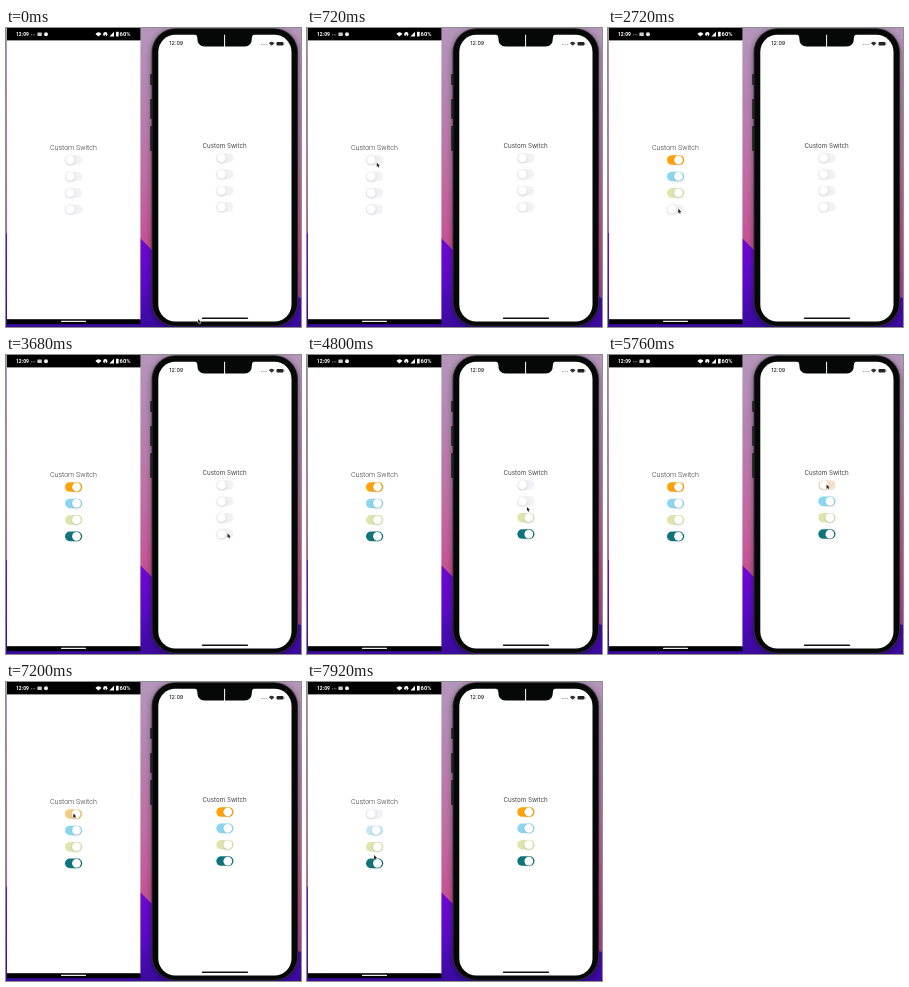
Animation of 295 by 299 pixels, one loop 8000 ms. Source, as an HTML page with a canvas:

```html
<!DOCTYPE html>
<html lang="en">
<head>
<meta charset="utf-8">
<title>Custom Switch</title>
<style>
html, body { margin: 0; width: 100%; height: 100%; overflow: hidden; background: #000; }
canvas { display: block; width: 295px; height: 299px; }
</style>
</head>
<body>
<canvas id="stage"></canvas>
<script>
const W = 295, H = 299, LOOP = 8000;
const canvas = document.getElementById('stage');
const dpr = window.devicePixelRatio || 1;
canvas.width = Math.round(W * dpr);
canvas.height = Math.round(H * dpr);
const ctx = canvas.getContext('2d');
ctx.scale(dpr, dpr);

const OFF = [242, 242, 245];
const COLORS = [[255, 163, 11], [139, 215, 242], [226, 228, 174], [16, 116, 124]];

// The left column is switched on downwards, the right one upwards;
// then the first two on the left are switched off again.
const switches = COLORS.flatMap((color, i) => [
  { color, i, x: 59, y: 132 + 16.45 * i, on: 950 + 610 * i, off: i < 2 ? 7000 + 690 * i : Infinity },
  { color, i, x: 210.3, y: 130 + 16.35 * i, on: 5700 - 640 * i, off: Infinity }
]);

// The pointer visits every switch at the moment it is pressed.
const presses = switches
  .flatMap(s => [s.on, s.off].map(t => ({ t, x: s.x + 8.3 + s.i, y: s.y - 0.5 })))
  .filter(p => p.t < LOOP)
  .sort((a, b) => a.t - b.t);
const stops = [{ t: 0, x: 192, y: 291 }, ...presses, { t: LOOP, x: 67, y: 174 }];

const clamp = v => Math.max(0, Math.min(1, v));
const smooth = v => v * v * (3 - 2 * v);
const lerp = (a, b, k) => a + (b - a) * k;

function box(x, y, w, h, r, fill) {
  ctx.beginPath();
  ctx.roundRect(x, y, w, h, r);
  ctx.fillStyle = fill;
  ctx.fill();
}

function dot(x, y, r, fill) {
  ctx.beginPath();
  ctx.arc(x, y, r, 0, Math.PI * 2);
  ctx.fillStyle = fill;
  ctx.fill();
}

function poly(points, fill) {
  ctx.beginPath();
  points.forEach(([x, y]) => ctx.lineTo(x, y));
  ctx.closePath();
  ctx.fillStyle = fill;
  ctx.fill();
}

function label(str, x, y, font, fill, align = 'left') {
  ctx.font = font;
  ctx.textAlign = align;
  ctx.fillStyle = fill;
  ctx.fillText(str, x, y);
}

function wifi(x, y, r, fill) {
  ctx.beginPath();
  ctx.moveTo(x, y);
  ctx.arc(x, y, r, -Math.PI * 0.77, -Math.PI * 0.23);
  ctx.closePath();
  ctx.fillStyle = fill;
  ctx.fill();
}

function shadow(color, blur, dy) {
  ctx.shadowColor = color;
  ctx.shadowBlur = blur * dpr;
  ctx.shadowOffsetY = dy * dpr;
}

function vertical(top, ...colors) {
  const g = ctx.createLinearGradient(0, top, 0, H);
  colors.forEach((c, i) => g.addColorStop(i / (colors.length - 1), c));
  return g;
}

function wallpaper() {
  ctx.fillStyle = vertical(0, '#b596bb', '#b583b0', '#bf6ea2', '#c64f90', '#9c3fb0');
  ctx.fillRect(0, 0, W, H);
  poly([[0, 205], [134, 210], [150, 226], [W, 270], [W, H], [0, H]],
    vertical(210, '#7008d4', '#5a0bc6', '#3a0a9e'));
}

function leftPhone() {
  ctx.fillStyle = '#fff';
  ctx.fillRect(1, 12, 133.4, 280);
  ctx.fillStyle = '#000';
  ctx.fillRect(1, 0, 133.4, 12.4);
  ctx.fillRect(1, 291.2, 133.4, 5);
  box(55, 292.8, 25, 1.3, 0.6, '#eee');

  label('12:09', 10, 8, 'bold 5px Roboto, sans-serif', '#fff');
  for (let i = 0; i < 3; i++) dot(25.5 + i * 1.7, 6.7, 0.5, '#bbb');
  box(31.4, 4.5, 4.4, 3.6, 0.4, '#ccc');
  dot(40, 6.2, 2, '#eee');
  wifi(92.4, 8.6, 4, '#fff');
  dot(99.3, 6.2, 2.1, '#fff');
  dot(99.3, 7.2, 0.8, '#000');
  poly([[103.4, 8.4], [108, 8.4], [108, 3.8]], '#fff');
  box(110, 3.8, 2.6, 4.8, 0.5, '#fff');
  label('60%', 113.6, 8.3, 'bold 5.8px Roboto, sans-serif', '#fff');
  label('Custom Switch', 67.4, 121.5, '300 7px Roboto, sans-serif', '#333', 'center');
}

function rightPhone() {
  [[46, 11], [71, 20], [98, 25]].forEach(([y, h]) => box(144.2, y, 2.5, h, 0.7, '#222'));
  ctx.save();
  shadow('rgba(0,0,0,.45)', 6, 1);
  box(145.6, 0.2, 146.4, 298.3, 24, '#2e302f');
  ctx.restore();
  box(146.5, 1, 144.6, 296.7, 23, '#060707');
  box(152.3, 6.8, 133.2, 286.8, 17, '#fff');

  // Notch with flared top corners, mirrored about its centre
  const mid = 218.6;
  ctx.beginPath();
  ctx.moveTo(mid, 6);
  for (const side of [-1, 1]) {
    const at = d => mid + side * d;
    ctx.moveTo(mid, 6);
    ctx.lineTo(at(30.5), 6);
    ctx.quadraticCurveTo(at(27.3), 6.8, at(27.3), 10);
    ctx.quadraticCurveTo(at(27.3), 18.5, at(20), 18.5);
    ctx.lineTo(mid - side * 0.5, 18.5);
    ctx.lineTo(mid - side * 0.5, 6);
  }
  ctx.fillStyle = '#060707';
  ctx.fill('nonzero');

  label('12:09', 163.2, 17.4, '500 5.4px Inter, sans-serif', '#222');
  for (let i = 0; i < 4; i++) dot(255.5 + i * 1.7, 16.4, 0.5, '#888');
  wifi(265.7, 17.7, 3.7, '#333');
  box(270.5, 14, 7, 3.6, 1, '#222');
  box(277.9, 15.1, 0.6, 1.5, 0.3, '#777');
  label('Custom Switch', 218.6, 120.2, '6.25px Inter, sans-serif', '#444', 'center');
  box(195.8, 289.4, 46.3, 1.5, 0.75, '#111');
}

function drawSwitch(s, t) {
  const closing = t >= s.off;
  const p = closing ? 1 - clamp((t - s.off) / 400) : clamp((t - s.on) / 300);
  const slide = smooth(closing ? clamp(p / 0.6) : p);
  const rgb = OFF.map((c, i) => Math.round(lerp(c, s.color[i], p)));
  box(s.x, s.y - 4.8, 17.2, 9.6, 4.8, `rgb(${rgb})`);
  ctx.save();
  shadow('rgba(0,0,0,.2)', 2.2, 0.6);
  dot(s.x + lerp(5.2, 11.5, slide), s.y, 4.4, '#fff');
  ctx.restore();
}

function pointer(t) {
  const i = stops.findIndex(s => s.t > t);
  const a = stops[i - 1], b = stops[i];
  // Rest after each press, and arrive a little before the next one.
  const k = smooth(clamp(((t - a.t) / (b.t - a.t) - 0.3) / 0.5));
  ctx.save();
  ctx.translate(lerp(a.x, b.x, k), lerp(a.y, b.y, k));
  ctx.scale(0.8, 0.8);
  ctx.lineJoin = 'round';
  ctx.lineWidth = 1;
  ctx.strokeStyle = '#fff';
  poly([[0, 0], [0, 5.2], [1.2, 4.2], [2, 6], [2.9, 5.6], [2.1, 3.9], [3.7, 3.8]], '#222');
  ctx.stroke();
  ctx.fill();
  ctx.restore();
}

function draw(now) {
  const t = now % LOOP;
  wallpaper();
  leftPhone();
  rightPhone();
  switches.forEach(s => drawSwitch(s, t));
  pointer(t);
}

let start;
function tick(now) {
  start ??= now;
  draw(Math.max(0, now - start));
  requestAnimationFrame(tick);
}
draw(0);
requestAnimationFrame(tick);
</script>
</body>
</html>
```
